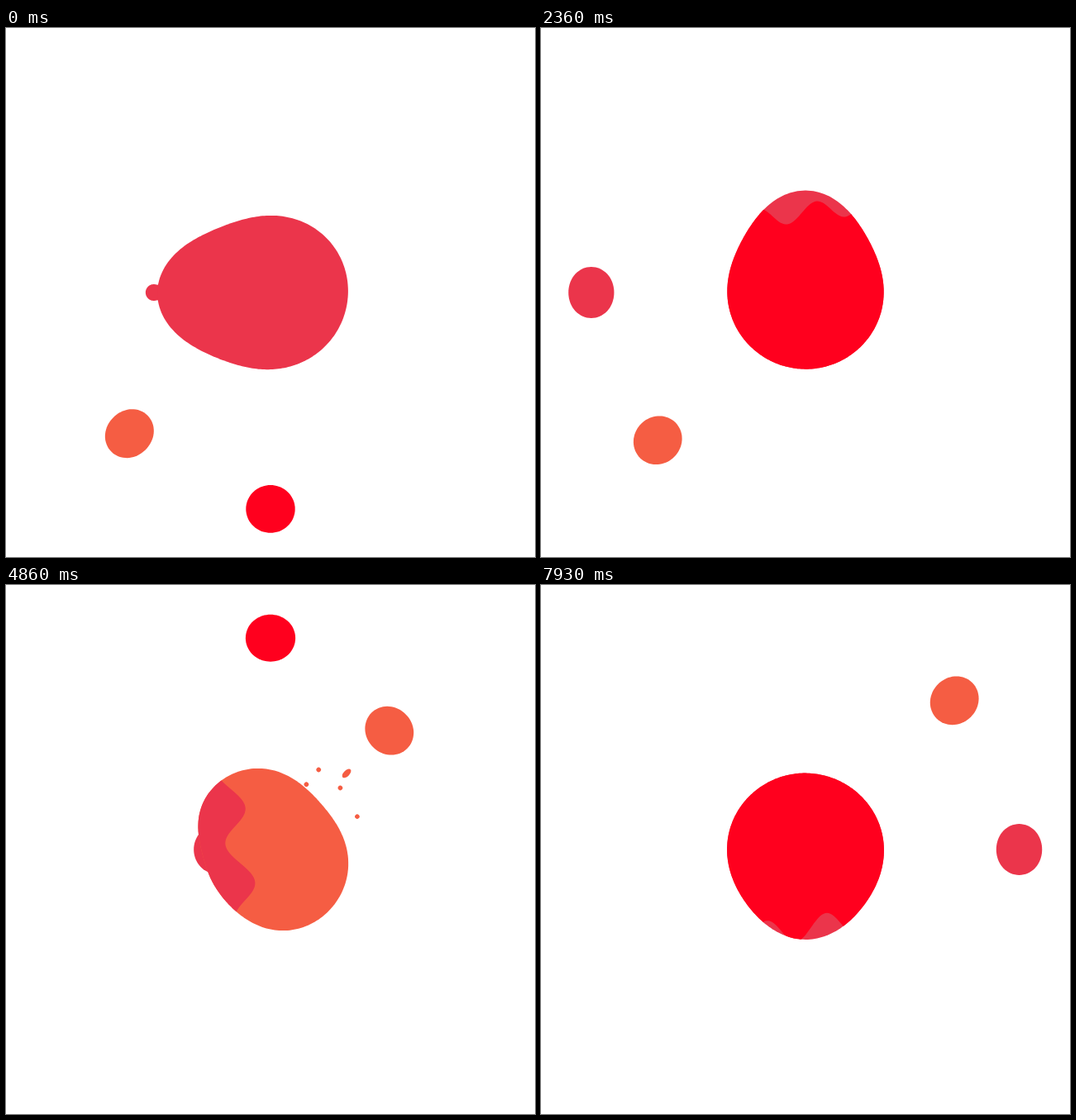
These frames come from a looping animation (640 px wide and 640 px high, 8 s). An HTML page with a canvas:

```html
<!DOCTYPE html>
<html lang="en">
<head>
<meta charset="utf-8">
<title>Drops</title>
<style>
  html, body { margin: 0; width: 100%; height: 100%; overflow: hidden; background: #fff; }
  canvas { display: block; width: 640px; height: 640px; }
</style>
</head>
<body>
<canvas></canvas>
<script>
const LOOP = 8000, PERIOD = 5640, TAU = Math.PI * 2;
const canvas = document.querySelector('canvas');
const ctx = canvas.getContext('2d');
const scale = window.devicePixelRatio || 1;
canvas.width = canvas.height = 640 * scale;

// Each drop leaves the core at `exit` along `angle`, then comes back through it.
const drops = [
  { color: '#eb354b', exit: 0, angle: Math.PI },
  { color: '#ff001e', exit: 2800, angle: -Math.PI / 2 },
  { color: '#f55d43', exit: 4260, angle: -Math.PI / 4 }
];

// Sideways offset and resting distance of the splashed dots
const spray = [[-27, 127], [-25, 104], [7, 130], [46, 120], [19, 92]];

const clamp = (x, a, b) => Math.min(b, Math.max(a, x));
const gauss = (x, w) => Math.exp(-((x / w) ** 2));
const wrap = a => Math.atan2(Math.sin(a), Math.cos(a));
function smooth(a, b, x) {
  const s = clamp((x - a) / (b - a), 0, 1);
  return s * s * (3 - 2 * s);
}

// In all of these, u is the time since the drop left the core.
const distance = u => 269 - 128 * Math.exp(-u / 900) - 181 * Math.exp((u - 4810) / 420);
const radius = u => u < 0 ? 10 * smooth(-160, 0, u) : 10 + 19.3 * smooth(0, 600, u);
const stretch = u => 1.7 * smooth(300, 600, u) * Math.cos((u - 1385) / 2045 * TAU);
const bulge = u => 43 * smooth(-640, -330, u) * (1 - smooth(0, 330, u));
const squash = u => u < 0 ? 0 : -18 * Math.sin(u / 2600 * TAU) * Math.exp(-u / 1000);
const dent = u => -9 * gauss(u + 800, 100);
const front = u => -125 + 222 * smooth(-1000, -480, u) + 60 * smooth(-430, -250, u);
const wave = u => 15 * Math.sin((u + 640) / 560 * TAU);

// Runs `paint` with x pointing along `angle` from the stage centre.
function along(angle, paint) {
  ctx.save();
  ctx.rotate(angle);
  paint();
  ctx.restore();
}

function polar(cx, radiusAt, steps) {
  ctx.beginPath();
  for (let i = 0; i < steps; i++) {
    const a = i / steps * TAU, r = radiusAt(a);
    ctx.lineTo(cx + r * Math.cos(a), r * Math.sin(a));
  }
  ctx.closePath();
}

function oval(x, y, rx, ry) {
  ctx.beginPath();
  ctx.ellipse(x, y, rx, ry, 0, 0, TAU);
  ctx.fill();
}

// Every passage through the core around time t, oldest first
function passages(t) {
  const list = [];
  for (const { color, exit, angle } of drops) {
    for (let k = -1; k <= 2; k++) {
      list.push({ color, u: t - exit - k * PERIOD, angle: angle + k * Math.PI });
    }
  }
  return list.sort((a, b) => b.u - a.u);
}

function coreRadius(a, events) {
  let r = 93.5;
  for (const { u, angle } of events) {
    const d = wrap(a - angle);
    r += bulge(u) * gauss(d, 0.68) + dent(u) * gauss(wrap(d + Math.PI), 0.5);
    r += squash(u) * (Math.cos(2 * d) + 0.08 * Math.cos(4 * d));
  }
  return r;
}

function fillFlood(u) {
  const q = clamp((u + 780) / 300, 0, 1);
  const mid = -6 + 19 * q, size = 90 - 20 * q;
  ctx.beginPath();
  ctx.moveTo(-260, -160);
  for (let y = -160; y <= 160; y += 2) {
    ctx.lineTo(front(u) + 0.13 * y + wave(u) * Math.cos((y - mid) / size * TAU), y);
  }
  ctx.lineTo(-260, 160);
  ctx.fill();
}

function drawCore(events) {
  const filled = events.filter(e => e.u >= -250);
  const shape = a => coreRadius(a, events);
  polar(0, shape, 240);
  ctx.fillStyle = filled[filled.length - 1].color;
  ctx.fill();
  ctx.clip();
  for (const { u, angle, color } of events) {
    if (u < -960 || u >= -250) continue;
    ctx.fillStyle = color;
    along(angle, () => fillFlood(u));
  }
}

function drawNeck(u) {
  if (u < 0 || u > 420) return;
  const w = 11 * (1 - u / 420), x0 = 80;
  const tip = 97 + bulge(u), end = radius(u) * 0.7;
  ctx.beginPath();
  ctx.moveTo(x0, -w - 8);
  ctx.quadraticCurveTo(tip, -w, distance(u), -end);
  ctx.lineTo(distance(u), end);
  ctx.quadraticCurveTo(tip, w, x0, w + 8);
  ctx.fill();
}

function drawSpray(u) {
  if (u < 420 || u > 1250) return;
  const lag = Math.exp((600 - u) / 50);
  for (const [y, rest] of spray) {
    const life = Math.max(660, 800 - 9 * y);
    const r = 2.8 * Math.sqrt(clamp((life - u) / (life - 600), 0, 1));
    oval(Math.max(60, rest - 18 * lag), y, r, r);
  }
  const fade = clamp((1250 - u) / 600, 0, 1);
  oval(Math.max(60, 160 - 32 * lag + u / 380), 0, 2 + 4.7 * fade, 0.8 + 2.8 * fade);
}

function drawDrop({ u, angle, color }) {
  if (u < -160 || u > 5000) return;
  ctx.fillStyle = color;
  along(angle, () => {
    drawNeck(u);
    drawSpray(u);
    polar(distance(u), a => radius(u) + stretch(u) * Math.cos(2 * a), 72);
    ctx.fill();
  });
}

function draw(t) {
  ctx.setTransform(scale, 0, 0, scale, 0, 0);
  ctx.fillStyle = '#fff';
  ctx.fillRect(0, 0, 640, 640);
  ctx.translate(320, 320);
  const events = passages(t);
  events.forEach(drawDrop);
  ctx.save();
  drawCore(events);
  ctx.restore();
}

function tick() {
  draw(performance.now() % LOOP);
  requestAnimationFrame(tick);
}
tick();
</script>
</body>
</html>
```
